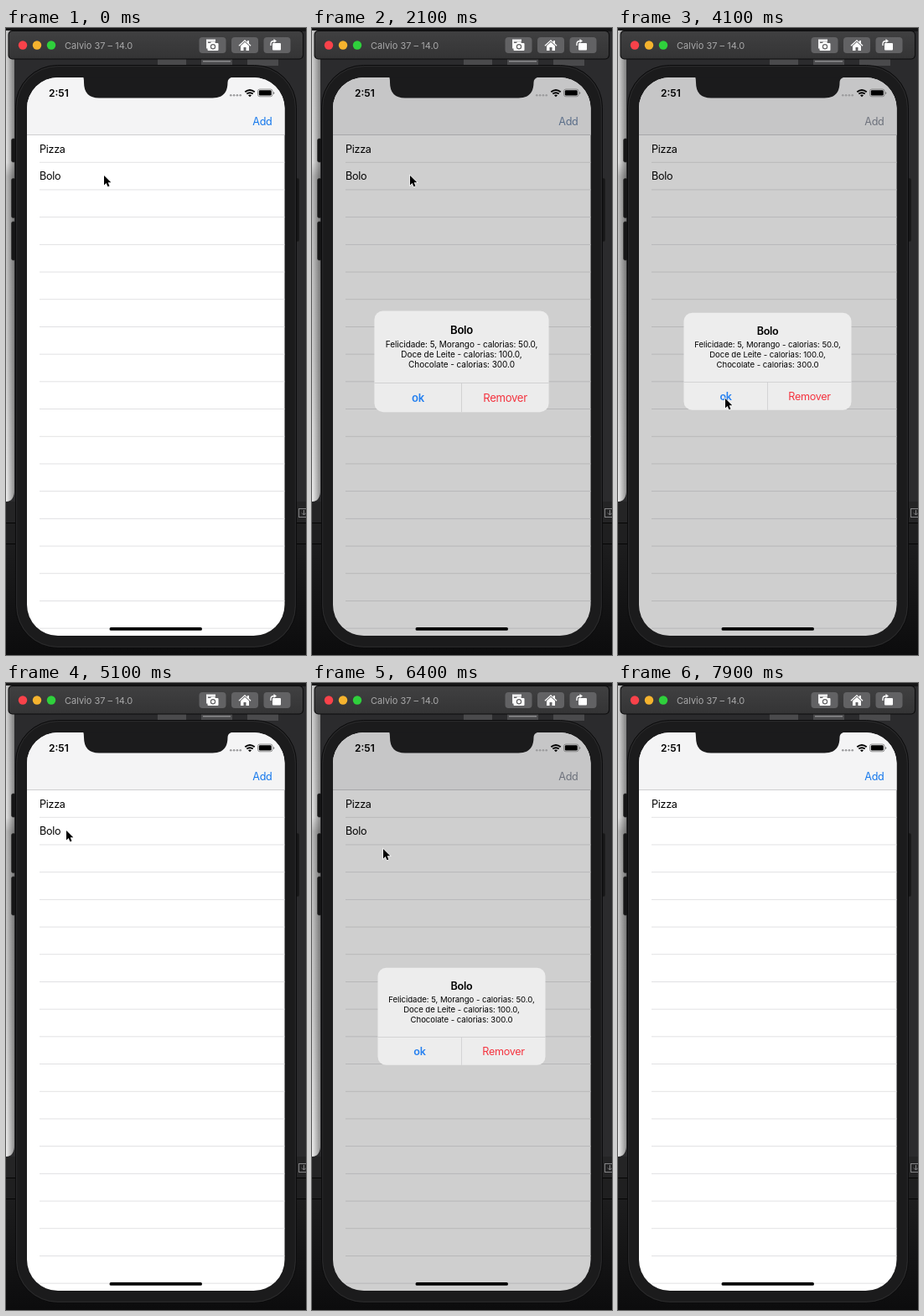
An HTML page that plays this animation: 358 by 748 pixels, repeating every 8700 ms.

```html
<!DOCTYPE html>
<html lang="pt">
<head>
<meta charset="utf-8">
<title>Lista</title>
<style>
  html, body { margin: 0; width: 100%; height: 100%; overflow: hidden; background: #161617; }
  svg { display: block; width: 100vw; height: 100vh; }
  text { font-family: Inter, Roboto, sans-serif; font-size: 12.6px; letter-spacing: -.3px; }
  .mid { text-anchor: middle; }
  .bold { font-weight: 600; }
  .small { font-size: 9.6px; letter-spacing: -.05px; }
</style>
</head>
<body>
<svg viewBox="0 0 358 748">
  <defs>
    <linearGradient id="bar" x2="0" y2="1">
      <stop stop-color="#404041"/><stop offset="1" stop-color="#343435"/>
    </linearGradient>
    <linearGradient id="paper" x2="0" y2="1">
      <stop stop-color="#cfcfcf"/><stop offset=".28" stop-color="#e4e4e4"/>
      <stop offset=".31" stop-color="#bcbcbc"/><stop offset=".7" stop-color="#d2d2d2"/>
      <stop offset="1" stop-color="#f0f0f0"/>
    </linearGradient>
    <linearGradient id="shade">
      <stop stop-opacity="0"/><stop offset="1" stop-opacity=".4"/>
    </linearGradient>
    <linearGradient id="floor" x2="0" y2="1">
      <stop stop-color="#1d1d1e"/><stop offset="1" stop-color="#0c0c0d"/>
    </linearGradient>
    <clipPath id="screen"><rect x="25" y="59" width="307.5" height="666" rx="37"/></clipPath>
  </defs>

  <!-- desktop behind the phone -->
  <rect width="358" height="748" fill="#2b2b2d"/>
  <rect width="358" height="4" fill="#161617"/>
  <g fill="#4a4a4c">
    <path d="M181 37h34v8h-34zM233 37h37v8h-37zM288 37h37v8h-37z"/>
    <path d="M235 39h33v1.5h-33z" fill="#8a8a8c"/>
  </g>
  <path id="sheet" d="M0 3H10V550Q10 565 0 565Z" fill="url(#paper)"/>
  <path d="M0 3H10V550Q10 565 0 565Z" fill="url(#shade)"/>
  <rect y="565" width="358" height="25" fill="#242425"/>
  <rect y="590" width="358" height="1" fill="#050505"/>
  <rect y="591" width="358" height="24" fill="#1f1f20"/>
  <rect y="615" width="358" height="133" fill="url(#floor)"/>
  <rect y="615" width="358" height="1" fill="#050505"/>
  <g fill="none" stroke="#858587">
    <rect x="349.5" y="573.5" width="12" height="10"/>
    <path d="M355.5 575v6m-2.5-2.5 2.500 2.500 2.500-2.500"/>
  </g>

  <!-- window bar -->
  <rect x="2.500" y="3" width="352.500" height="34.500" rx="5" fill="#0c0c0d"/>
  <rect x="3.500" y="4" width="350.500" height="32.500" rx="4.500" fill="url(#bar)"/>
  <circle cx="20" cy="20.500" r="5.200" fill="#f9424a"/>
  <circle cx="37" cy="20.500" r="5.200" fill="#f5b32e"/>
  <circle cx="54" cy="20.500" r="5.200" fill="#2fd03c"/>
  <text x="70" y="24.500" fill="#a8a8a9" style="font-size:11px;letter-spacing:0">Calvio 37 – 14.0</text>
  <g fill="#626264">
    <rect x="230.500" y="11" width="32" height="19" rx="4"/>
    <rect x="269" y="11" width="32" height="19" rx="4"/>
    <rect x="307.500" y="11" width="32" height="19" rx="4"/>
  </g>
  <g fill="#fff">
    <path d="M239 13.500h11v3h-9v8h-2z" opacity=".9"/>
    <path d="M241.500 18h2.500l1-1.500h4l1 1.500h2.500q1 0 1 1v7q0 1-1 1h-11q-1 0-1-1v-7q0-1 1-1z"/>
    <circle cx="247" cy="22.300" r="2.600" fill="none" stroke="#626264" stroke-width="1.200"/>
    <path d="M277.500 20.800 285 14l3 2.700v-1.700h2v3.500l2.500 2.300-.8.900L285 15.600l-6.700 6.100zM280 21.300 285 16.800l5 4.500V27h-3.500v-4h-3v4H280z"/>
    <rect x="318" y="18" width="10" height="8.500" rx="1"/>
    <path d="M316 21v-2q0-3.500 4-3.500" fill="none" stroke="#fff" stroke-width="1.300"/>
    <path d="M319.500 13l3.500 2.500-3.500 2.500z"/>
  </g>

  <!-- phone -->
  <g fill="#161617" stroke="#2c2c2d" stroke-width=".6">
    <rect x="6.500" y="132" width="8" height="28" rx="2"/>
    <rect x="6.500" y="179.500" width="8" height="47" rx="2"/>
    <rect x="6.500" y="231" width="8" height="46" rx="2"/>
    <rect x="342" y="179" width="8" height="76" rx="2"/>
  </g>
  <rect x="11.500" y="44.500" width="335" height="695" rx="50" fill="#1b1b1c" stroke="#0b0b0c"/>
  <rect x="12.700" y="45.700" width="332.600" height="692.600" rx="49" fill="none" stroke="#303031" stroke-width=".8"/>

  <g clip-path="url(#screen)">
    <rect x="25" y="59" width="308" height="667" fill="#fff"/>
    <rect x="25" y="59" width="308" height="68.500" fill="#f4f4f5"/>
    <rect x="25" y="127" width="308" height=".8" fill="#c4c4c6"/>
    <rect id="rowPress" x="25" y="160" width="308" height="33" fill="#d1d1d6"/>
    <g id="lines" fill="#dedee0"></g>
    <text x="40" y="148.500">Pizza</text>
    <text id="cake" x="40" y="181.200">Bolo</text>
    <text id="add" x="317.500" y="115.700" text-anchor="end">Add</text>
    <rect id="dim" x="25" y="59" width="308" height="667"/>
    <text x="51" y="81.800" class="bold" style="font-size:12px;letter-spacing:0">2:51</text>
    <g id="dots" fill="#9b9b9d"></g>
    <g fill="none" stroke="#000" stroke-width="1.900">
      <path d="M285.300 76.300q5.700-4.600 11.400 0M287.300 78.600q3.700-2.900 7.400 0"/>
    </g>
    <path d="M289 80.300q2-1.400 4 0l-2 2z"/>
    <rect x="300.500" y="73" width="17.500" height="8.800" rx="2.400" fill="none" stroke="#777" stroke-width=".8"/>
    <rect x="301.800" y="74.300" width="14.900" height="6.200" rx="1.300"/>
    <path d="M319 76v3q1.300-.5 1.300-1.500t-1.300-1.500z" fill="#777"/>
    <rect x="123.500" y="715" width="110.500" height="3.800" rx="1.900"/>

    <g id="alert">
      <rect x="78.500" y="339.800" width="200" height="116" rx="10" fill="#ededed"/>
      <rect id="okPress" x="78.500" y="423" width="100" height="32.800" rx="6" fill="#d6d6d6"/>
      <rect id="removePress" x="178.500" y="423" width="100" height="32.800" rx="6" fill="#d6d6d6"/>
      <path d="M78.500 422.500h200M178.500 422.500v33.300" stroke="#cdcdce" stroke-width=".8"/>
      <text x="178.500" y="366" class="mid bold">Bolo</text>
      <g class="mid">
        <text x="178.500" y="381.300" class="small">Felicidade: 5, Morango - calorias: 50.0,</text>
        <text x="178.500" y="393.200" class="small">Doce de Leite - calorias: 100.0,</text>
        <text x="178.500" y="405.100" class="small">Chocolate - calorias: 300.0</text>
      </g>
      <text x="128.500" y="443.700" class="mid bold" fill="#2580f0">ok</text>
      <text x="228.500" y="443.700" class="mid" fill="#f5333f">Remover</text>
    </g>
  </g>
  <path d="M86 58.500H92Q93 59.500 93 65Q93 83.500 111 83.500H246.500Q264.500 83.500 264.500 65Q264.500 59.500 271 58.500Z" fill="#1b1b1c"/>

  <path id="cursor" d="M0 0V11.400L2.600 9 4.500 13.300 6.500 12.400 4.700 8.300H8.300Z" stroke="#fff" stroke-width="1.300" paint-order="stroke"/>
</svg>
<script>
const LOOP = 8700, STEP = 100;
const $ = id => document.getElementById(id);
const show = (id, on) => { $(id).style.visibility = on ? 'visible' : 'hidden'; };
const clamp = x => Math.max(0, Math.min(1, x));
const smooth = x => { x = clamp(x); return x * x * (3 - 2 * x); };
const within = (t, from, to) => t >= from && t < to;

// Each visit of the dialog: first and last visible moment, and the starts of its two eases.
const visits = [
  { from: 2100, to: 4600, open: 1830, close: 4210 },
  { from: 5500, to: 7400, open: 5490, close: 7010 }
];

// Pointer tip: time, x, y
const path = [
  [3000, 117, 176], [3200, 118, 200], [3400, 123, 330], [3600, 127, 430], [3700, 128, 442],
  [4500, 128, 442], [4600, 122, 390], [4700, 116, 298], [4800, 105, 244], [4900, 76, 182], [5100, 72, 176],
  [6300, 72, 176], [6500, 98, 220], [6700, 190, 376], [6900, 231, 446],
  [7400, 231, 446], [7500, 247, 338], [7600, 263, 220], [7700, 280, 90]
];

function pointerAt(t) {
  const next = path.findIndex(p => p[0] > t);
  if (next < 1) return (next ? path[path.length - 1] : path[0]).slice(1);
  const a = path[next - 1], b = path[next], k = (t - a[0]) / (b[0] - a[0]);
  return [a[1] + (b[1] - a[1]) * k, a[2] + (b[2] - a[2]) * k];
}

function addRect(parent, x, y, width, height, rx = 0) {
  const r = document.createElementNS('http://www.w3.org/2000/svg', 'rect');
  Object.entries({ x, y, width, height, rx }).forEach(([k, v]) => r.setAttribute(k, v));
  $(parent).append(r);
}
for (let i = 1; i <= 18; i++) addRect('lines', 40, 127.1 + i * 32.7, 293, .9);
for (let i = 0; i < 4; i++) addRect('dots', 267 + i * 3.8, 79, 2.6, 2.6, 1.3);

function draw(t) {
  const visit = visits.find(v => within(t, v.from, v.to));
  let fade = 0, tint = 0, scale = 1;
  if (visit) {
    const age = (t - visit.open) / 1000;
    const spring = (1 + 11 * age) * Math.exp(-11 * age);
    const leave = 1 - smooth((t - visit.close) / 300);
    fade = smooth(age / .28) * leave;
    tint = (1 - spring) * leave;
    scale = 1 + .2 * spring;
  }
  $('dim').style.opacity = .19 * fade;
  $('alert').style.opacity = fade;
  $('alert').setAttribute('transform', `translate(178.5 397.8) scale(${scale}) translate(-178.5 -397.8)`);
  const mix = (a, b) => Math.round(a + (b - a) * tint);
  $('add').style.fill = `rgb(${mix(22, 134)},${mix(120, 139)},${mix(236, 152)})`;

  show('rowPress', within(t, 1900, 2100) || within(t, 5200, 5500));
  show('okPress', within(t, 4200, 4300));
  show('removePress', within(t, 7000, 7100));
  show('cake', t < 7400);
  show('cursor', t < 7800);
  $('cursor').setAttribute('transform', `translate(${pointerAt(t)})`);
}

function frame() {
  const t = performance.now() % LOOP;
  draw(Math.floor(t / STEP) * STEP);
  requestAnimationFrame(frame);
}
frame();
</script>
</body>
</html>
```
